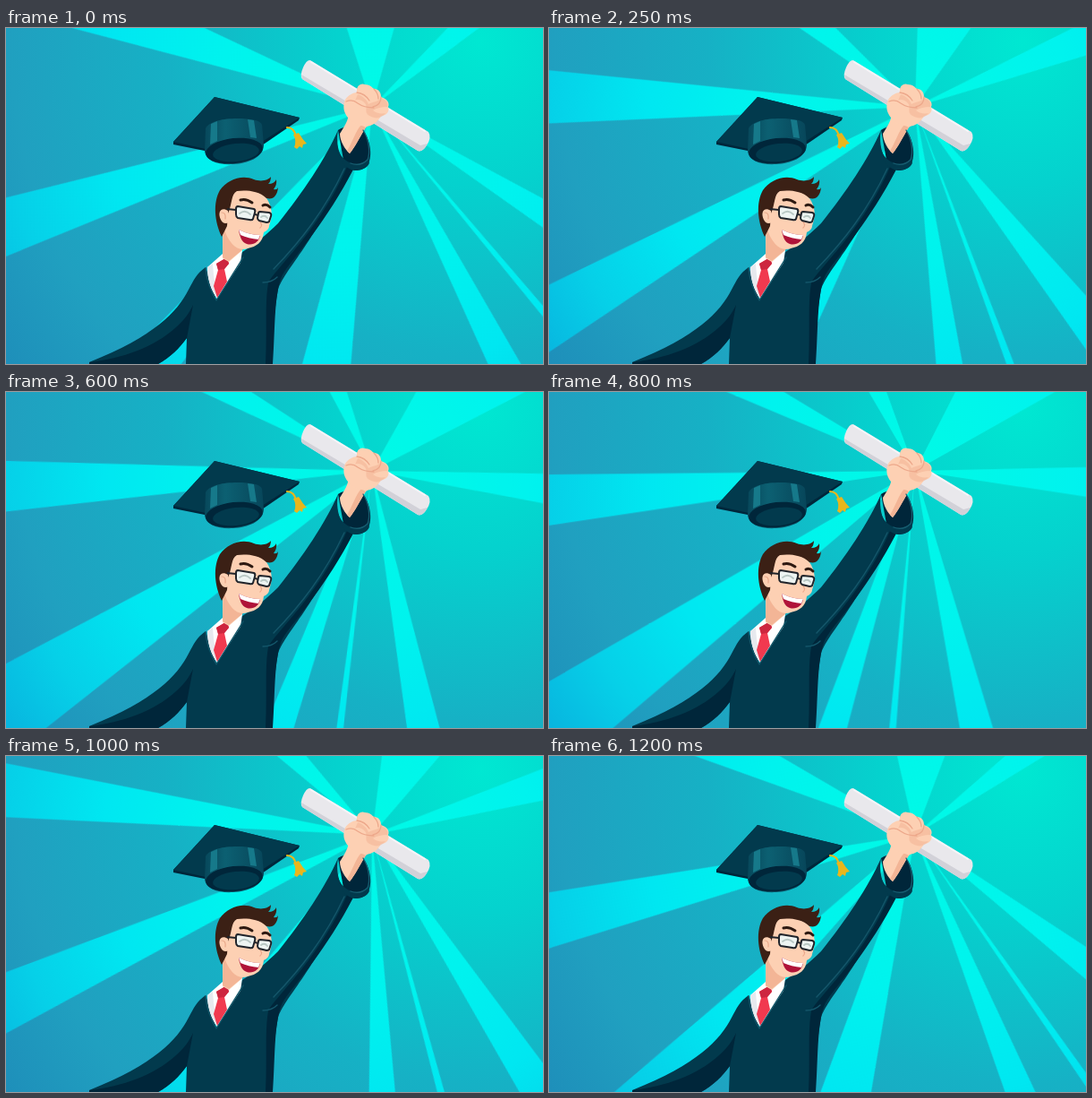
An HTML page that plays this animation: 600 px wide and 375 px high, repeating every 1.25 s.

```html
<!DOCTYPE html>
<html lang="en">
<head>
<meta charset="utf-8">
<title>Graduate</title>
<style>
html, body { margin: 0; width: 100%; height: 100%; overflow: hidden; background: #18b0c6; }
svg { display: block; width: 600px; height: 375px; }
#rays { transform-origin: 409px 88px; animation: swing 1250ms infinite; }
@keyframes swing {
  0% { transform: rotate(-44.8deg); animation-timing-function: steps(14); }
  56% { transform: rotate(10.1deg); animation-timing-function: steps(11); }
  100% { transform: rotate(-44.8deg); }
}
.gown { fill: #023a4d; }
.dark { fill: #00263a; }
.skin { fill: #fdd0b3; }
.shade { fill: #f3b596; }
.hair { fill: #3b2015; }
.line { fill: none; stroke-linecap: round; stroke-linejoin: round; }
</style>
</head>
<body>
<svg viewBox="0 0 600 375">
  <defs>
    <radialGradient id="sky" gradientUnits="userSpaceOnUse" cx="530" cy="15" r="640">
      <stop offset="0" stop-color="#00e8d2"/>
      <stop offset=".25" stop-color="#05d2ce"/>
      <stop offset=".55" stop-color="#16b1c5"/>
      <stop offset=".82" stop-color="#20a0c0"/>
      <stop offset="1" stop-color="#1e8fba"/>
    </radialGradient>
    <radialGradient id="glow" gradientUnits="userSpaceOnUse" cx="409" cy="88" r="500">
      <stop offset="0" stop-color="#00fae6"/>
      <stop offset=".35" stop-color="#00f3ee"/>
      <stop offset=".6" stop-color="#00e7f1"/>
      <stop offset=".82" stop-color="#06d0e8"/>
      <stop offset="1" stop-color="#08b5df"/>
    </radialGradient>
    <linearGradient id="band" x1="0" x2="1" y1="0" y2="0">
      <stop offset="0" stop-color="#07485b"/>
      <stop offset=".35" stop-color="#0c6072"/>
      <stop offset="1" stop-color="#07465a"/>
    </linearGradient>
  </defs>

  <rect width="600" height="375" fill="url(#sky)"/>
  <g id="rays" fill="url(#glow)"></g>

  <!-- cap -->
  <path class="dark" d="M187 127L233 77L328 100L327 103L286 131L222 137L187 130Z"/>
  <path class="gown" d="M187 127L233 77L328 100L286 127L223 135Z"/>
  <path fill="url(#band)" d="M223 112C227 104 243 101 258 101C274 101 284 103 286 108L288 131C287 145 270 151 254 152C237 153 224 149 222 138Z"/>
  <path fill="#16798a" d="M229 107L236 104L236 126L228 130ZM270 102L277 103L280 123L273 122Z"/>
  <ellipse class="dark" cx="255" cy="137" rx="32" ry="14" transform="rotate(-6 255 137)"/>
  <ellipse class="gown" cx="257" cy="139" rx="26" ry="10" transform="rotate(-6 257 139)"/>
  <path class="line" stroke="#e9b61c" stroke-width="2.2" d="M314 111Q322 111 324 121"/>
  <path fill="#e9b61c" d="M321 119L327 117Q331 124 336 129L332 130L331 134L328 132L325 135L322 133Q325 126 321 119Z"/>

  <!-- scroll -->
  <path fill="#e9e8ec" d="M340 36L472 116Q476 122 470 131Q465 139 460 137L331 57Q328 53 332 44Q336 35 340 36Z"/>
  <path fill="#d2d1d8" d="M330 52L463 131L471 129Q466 139 460 137L331 57Z"/>
  <path class="line" stroke="#f6f5f8" stroke-width="2" d="M341 38L468 115"/>

  <!-- sleeve opening, arm and fist -->
  <path class="dark" d="M371 114C382 107 397 109 402 119C408 130 409 146 404 151C397 157 384 155 377 147Z"/>
  <path class="skin" d="M381 92C385 99 380 107 373 118C373 126 379 136 384 140C390 133 395 122 402 111L412 104L398 82Z"/>
  <path class="shade" d="M402 111C395 122 390 133 384 140L381 137C388 126 390 116 397 108Z"/>
  <path class="skin" d="M379 80C382 75 388 72 392 72C391 65 396 61 401 63C406 63 409 66 411 68C418 68 419 74 419 77C426 79 429 84 427 88C429 93 425 98 419 98C417 102 413 107 407 109C397 111 387 107 382 100C377 94 376 87 379 80Z"/>
  <path class="shade" d="M393 74C399 76 403 80 405 85C410 82 417 82 419 78C424 80 428 84 426 88C420 88 415 89 410 92C414 95 418 96 424 95C420 101 413 102 406 98C399 94 405 89 401 84C398 80 392 79 390 81Z" opacity=".55"/>
  <path class="line" stroke="#eda88b" stroke-width="1.3" d="M392 72Q401 73 406 81M411 68Q416 73 416 79M419 77Q419 86 410 88M380 82Q387 79 393 84Q400 89 411 89"/>

  <!-- gown -->
  <path class="gown" d="M223 267C213 274 210 281 204 292C191 317 166 344 93 373V375H170C184 367 194 357 202 346L201 375H298C297 349 299 319 304 292C311 270 341 245 385 154L406 150C405 156 395 161 385 157C373 149 368 130 371 114C357 146 332 183 304 218C291 231 277 242 264 250L235 303Z"/>
  <path class="dark" d="M93 373C130 369 166 356 190 334C199 326 205 318 209 309L202 346C194 357 184 367 170 375H93Z"/>
  <path class="dark" d="M388 158C358 216 325 252 311 272C299 289 301 336 298 375H290C292 338 289 306 293 285C299 270 350 227 381 155Z"/>
  <path class="line" stroke="#14566a" stroke-width="1.4" d="M378 157C356 204 329 238 299 269M287 284Q297 284 303 278"/>
  <path class="gown" d="M371 114C367 128 371 145 384 150C393 154 402 150 406 144C408 153 399 160 389 159C374 156 364 136 371 114Z"/>
  <path class="line" stroke="#175d70" stroke-width="1.3" d="M399 114C406 125 407 139 404 147Q396 155 385 151"/>

  <!-- shirt and tie -->
  <path fill="#fff" d="M225 267L242 252L264 248L262 262L236 302C229 293 225 280 225 267Z"/>
  <path fill="#e7e9ee" d="M225 267L231 263C232 279 234 292 237 300L236 302C229 293 225 280 225 267Z"/>
  <path fill="#f1394f" d="M235 263L247 256L249 263L244 269L247 283L236 301L232 288L237 270Z"/>
  <path fill="#cd263f" d="M235 263L247 256L249 263L244 269L237 270Z"/>
  <path class="line" stroke="#0f5568" stroke-width="1.4" d="M223 268Q225 288 235 304L265 256"/>

  <!-- head -->
  <path class="skin" d="M242 215L242 257L249 261L264 248L262 230Z"/>
  <path class="shade" d="M243 219C245 233 253 246 266 246L249 260L242 256Z"/>
  <path class="skin" d="M246 185C258 178 279 178 289 187C296 196 298 205 296 214L294 221Q294 225 288 228C287 239 280 244 270 246C258 250 248 240 246 224Z"/>
  <path class="hair" d="M241 233C233 216 231 195 239 181C247 169 264 163 277 169C285 172 293 170 296 166Q296 171 293 174Q300 174 302 169Q303 175 299 180Q303 181 304 178C303 188 298 192 291 190C282 181 267 181 258 182C251 186 253 196 248 207L247 221Z"/>
  <path class="skin" d="M248 204C240 199 236 206 240 214Q243 220 249 217Z"/>
  <path class="line" stroke="#e9a98b" stroke-width="1.2" d="M241 206Q246 206 245 213"/>
  <path class="line" stroke="#2d1911" stroke-width="3" d="M262 192Q268 190 275 195M287 198Q291 196 295 200"/>
  <path class="line" stroke="#eca98c" stroke-width="1.3" d="M282 214Q288 220 284 223"/>
  <g fill="#edf4f2" stroke="#20242b" stroke-width="2">
    <path d="M259 199L277 202Q279 203 278 206L276 213Q275 215 272 214L259 212Q257 211 257 208L257 202Q257 199 259 199Z"/>
    <path d="M284 205L294 206Q297 207 296 210L294 216Q293 217 291 217L283 215Q281 214 281 212L282 207Q282 205 284 205Z"/>
    <path fill="none" d="M247 202L257 203M278 208L282 209"/>
  </g>
  <path class="line" stroke="#b9c8c5" stroke-width="1.8" d="M261 207Q267 202 273 208M285 211Q289 208 292 212"/>
  <path fill="#b01339" d="M260 225Q272 231 284 231C283 239 276 243 269 241C263 239 261 232 260 225Z"/>
  <path fill="#fff" d="M260 225Q272 231 284 231L282 236Q271 235 262 231Z"/>
</svg>
<script>
// Wedge edges in degrees, clockwise from the right
const wedges = [
  [202.6, 210.9], [171.4, 179.3], [139.5, 150], [104.7, 110.5], [94.1, 95.6],
  [73, 80], [-1.3, 8.5], [-63, -29.5], [239.5, 250]
];
const cx = 409, cy = 88, reach = 900;
const point = deg => {
  const a = deg * Math.PI / 180;
  return `${cx + reach * Math.cos(a)},${cy + reach * Math.sin(a)}`;
};
document.getElementById('rays').innerHTML = wedges
  .map(([a, b]) => `<polygon points="${cx},${cy} ${point(a)} ${point(b)}"/>`)
  .join('');
</script>
</body>
</html>
```
